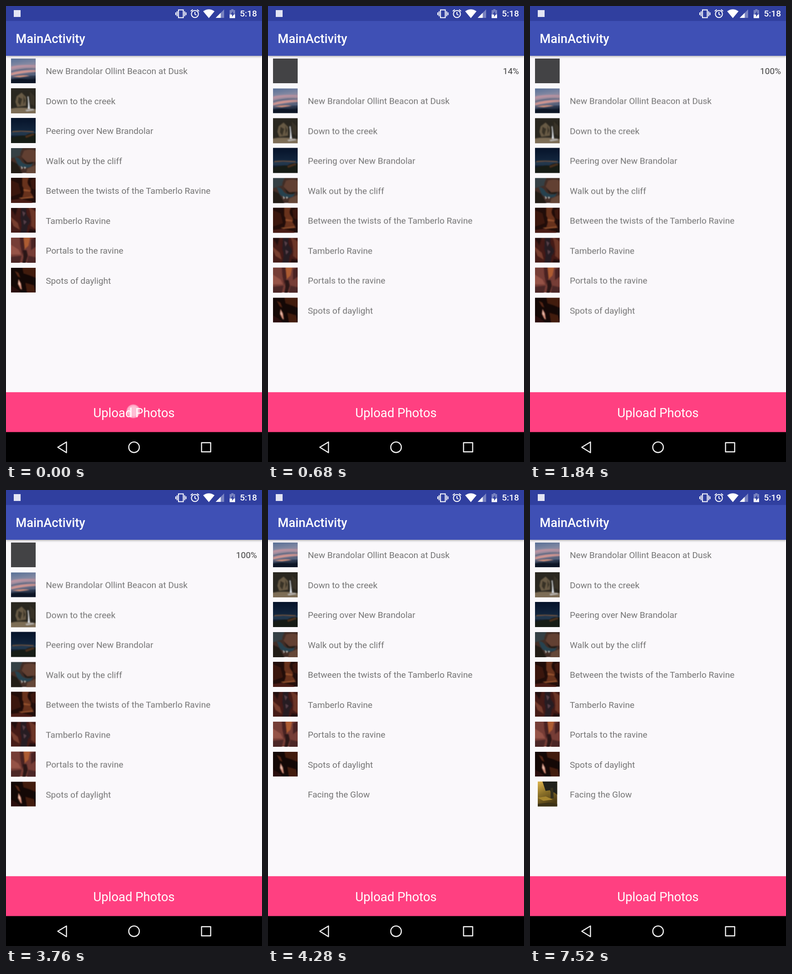
Write an HTML page that moves like this. It is 561 px wide and 998 px high and loops after 7.56 s.

```html
<!DOCTYPE html>
<html lang="en">
<head>
<meta charset="utf-8">
<title>Photo upload list</title>
<style>
  html, body { margin: 0; width: 100%; height: 100%; overflow: hidden; }
  body { position: relative; background: #faf8fb; font: 19.1px Roboto, sans-serif; color: #757575; }
  body > * { position: absolute; }

  /* every animation shares one 7560 ms loop */
  .anim { animation: 7560ms linear infinite both; }

  .bar {
    left: 0; top: 0; width: 561px; height: 109px; line-height: 145px;
    background: #3f50b5; color: #fff; font-size: 27.3px; font-weight: 500;
    text-indent: 21.3px; box-shadow: 0 2px 4px rgba(0, 0, 0, .28);
  }
  .chrome { left: 0; top: 0; }
  .button {
    left: 0; top: 845px; width: 561px; line-height: 92px;
    color: #fff; font-size: 27.3px; text-align: center;
  }
  .clock {
    right: 11px; top: 0; line-height: 34px; color: #fff;
    font-weight: 500; animation-timing-function: step-end;
  }
  .before { animation-name: before; }
  .after { animation-name: after; }
  .touch {
    left: 262.5px; top: 871px; width: 32px; height: 32px; border-radius: 50%;
    background: radial-gradient(closest-side, rgba(255,255,255,.66) 60%, rgba(255,255,255,.52) 84%, rgba(255,255,255,0));
    animation-name: touch; animation-timing-function: step-end;
  }

  .list { left: 0; top: 109.1px; width: 561px; animation-name: shift; }
  .row { display: flex; align-items: center; height: 65.47px; white-space: nowrap; }
  .row svg { flex: none; width: 54.55px; height: 54.55px; margin: 0 21.8px 0 10.9px; }
  .row span { position: relative; top: 1px; }
  .late svg { animation-name: load; }
  .late span { animation-name: label; }

  .pending { left: 0; top: 109.1px; width: 561px; height: 65.47px; animation-name: pending; }
  .pending i { position: absolute; left: 10.9px; top: 5.46px; width: 54.55px; height: 54.55px; background: #434345; }
  .pending b {
    position: absolute; right: 10.9px; top: 1px; line-height: 65.47px;
    font-weight: 400; color: #424242; animation-timing-function: ease-out;
  }

  @keyframes touch { 0% { opacity: 1 } 1.587%, 100% { opacity: 0 } }
  @keyframes before { 0% { opacity: 1 } 99.471%, 100% { opacity: 0 } }
  @keyframes after { 0% { opacity: 0 } 99.471%, 100% { opacity: 1 } }
  @keyframes shift {
    0%, 3.439% { transform: none; animation-timing-function: cubic-bezier(.37, 0, .63, 1) }
    6.746% { transform: translateY(65.47px) }
    51.217% { transform: translateY(65.47px); animation-timing-function: cubic-bezier(.37, 0, .63, 1) }
    54.524%, 100% { transform: none }
  }
  @keyframes pending {
    0%, 3.439% { opacity: 0 }
    4.9%, 49.8% { opacity: 1 }
    51.217%, 100% { opacity: 0 }
  }
  @keyframes label { 0%, 54.524% { opacity: 0 } 56.11%, 100% { opacity: 1 } }
  @keyframes load { 0%, 60.847% { opacity: 0 } 65.4%, 100% { opacity: 1 } }

  @keyframes p10 { 0%, 3.84% { opacity: 1; animation-timing-function: ease-in } 5.69%, 100% { opacity: 0 } }
  @keyframes p14 { 0%, 3.84% { opacity: 0 } 5.69%, 8.99% { opacity: 1; animation-timing-function: ease-in } 12.17%, 100% { opacity: 0 } }
  @keyframes p35 { 0%, 8.99% { opacity: 0 } 12.17%, 12.7% { opacity: 1; animation-timing-function: ease-in } 15.87%, 100% { opacity: 0 } }
  @keyframes p37 { 0%, 12.7% { opacity: 0 } 15.87%, 15.88% { opacity: 1; animation-timing-function: ease-in } 18.52%, 100% { opacity: 0 } }
  @keyframes p62 { 0%, 15.88% { opacity: 0 } 18.52%, 19.05% { opacity: 1; animation-timing-function: ease-in } 21.69%, 100% { opacity: 0 } }
  @keyframes p87 { 0%, 19.05% { opacity: 0 } 21.69%, 21.7% { opacity: 1; animation-timing-function: ease-in } 24.34%, 100% { opacity: 0 } }
  @keyframes p100 { 0%, 21.7% { opacity: 0 } 24.34%, 100% { opacity: 1 } }
</style>
</head>
<body>

<svg width="0" height="0">
  <defs>
    <linearGradient id="dusk" x2=".15" y2="1">
      <stop offset="0" stop-color="#587097"/><stop offset=".3" stop-color="#8288a2"/>
      <stop offset=".5" stop-color="#a58c9a"/><stop offset=".66" stop-color="#72738a"/>
      <stop offset=".8" stop-color="#344058"/><stop offset="1" stop-color="#101826"/>
    </linearGradient>
    <linearGradient id="night" x2="0" y2="1">
      <stop offset="0" stop-color="#06132a"/><stop offset=".5" stop-color="#12253d"/>
      <stop offset="1" stop-color="#101518"/>
    </linearGradient>
    <linearGradient id="glow" x2=".4" y2="1">
      <stop offset="0" stop-color="#e0b650"/><stop offset=".5" stop-color="#8a7029"/>
      <stop offset="1" stop-color="#4a3a14"/>
    </linearGradient>
    <filter id="soft"><feGaussianBlur stdDeviation=".9"/></filter>
  </defs>
</svg>

<div class="list anim">
  <div class="row">
    <svg viewBox="0 0 40 40">
      <path fill="url(#dusk)" d="M0 0h40v40H0z"/>
      <g filter="url(#soft)">
        <path fill="#b993a0" d="M0 13Q14 9 40 11V13Q20 13 0 17z"/>
        <path fill="#d39690" d="M0 24Q18 18 40 19V21Q20 22 0 27z"/>
        <path fill="#5a6782" d="M0 20Q18 15 40 16V17Q16 18 0 22zM14 27l26-3v3z"/>
        <path fill="#d9967f" d="M2 29Q18 26 30 28L14 30z"/>
        <path fill="#111926" d="M-2 34Q12 31 24 33T42 32V42H-2z"/>
      </g>
    </svg><span>New Brandolar Ollint Beacon at Dusk</span>
  </div>
  <div class="row">
    <svg viewBox="0 0 40 40">
      <path fill="#2a2720" d="M0 0h40v40H0z"/>
      <g filter="url(#soft)">
        <path fill="#675a44" d="M9 13L17 7L24 14L24 28L10 30L7 22z"/>
        <path fill="#383126" d="M12 14l6 3l-3 11l-4-5zM20 12l3 8l-3 6zM30 5l8 8v16l-7-4z"/>
        <path fill="#7d6d57" d="M-2 33Q18 29 42 34V42H-2z"/>
        <path fill="#b9b5b1" d="M23 35l12-2l3 2l-13 2z"/>
        <path fill="#e0e4ea" d="M26.500 13h1.500Q29 22 30.500 33H27Q28 22 26.500 13z"/>
      </g>
    </svg><span>Down to the creek</span>
  </div>
  <div class="row">
    <svg viewBox="0 0 40 40">
      <path fill="url(#night)" d="M0 0h40v40H0z"/>
      <g filter="url(#soft)">
        <path fill="#20384d" d="M-2 23Q18 21 42 22V28H-2z"/>
        <path fill="#9a6a3a" d="M2 21.300l14-.8l20 .9v.9l-20-.8l-14 .9z"/>
        <path fill="#191a17" d="M-2 33Q14 27 23 28Q31 23 42 25V42H-2z"/>
        <path fill="#48301f" d="M23 29l12-4l3 2l-14 5z"/>
      </g>
    </svg><span>Peering over New Brandolar</span>
  </div>
  <div class="row">
    <svg viewBox="0 0 40 40">
      <path fill="#432e27" d="M0 0h40v40H0z"/>
      <g filter="url(#soft)">
        <path fill="#364044" d="M-2-2H20Q14 7 15 12L-2 17z"/>
        <path fill="#623f32" d="M21 4Q35 0 42 6V22L26 23L17 14z"/>
        <path fill="#274350" d="M6 15Q13 14 17 22Q24 29 35 25L32 30Q17 35 10 25z"/>
        <path fill="#211a19" d="M-2 20L10 25L19 42H-2zM18 16l8 7l12-1l-6 4l-9-1z"/>
        <path fill="#654737" d="M26 33l16-7v16H24z"/>
        <path fill="#c3c7c4" d="M16 29l3 3l-2 2zM21 30l3 1l-2 3z"/>
      </g>
    </svg><span>Walk out by the cliff</span>
  </div>
  <div class="row">
    <svg viewBox="0 0 40 40">
      <path fill="#210d0a" d="M0 0h40v40H0z"/>
      <g filter="url(#soft)">
        <path fill="#67301c" d="M18-2H30Q24 7 29 13T31 23L36 30L18 31Q23 20 18 13z"/>
        <path fill="#3a180f" d="M-2 3L12 9L16 25L-2 31zM31 4l11-5v21l-9-3z"/>
        <path fill="#96522f" d="M20 18l10 2l2 2l-12-1zM12 32l22-2l3 2l-20 2z"/>
        <path fill="#4a1e12" d="M-2 36l16-2l20 4v4H-2z"/>
      </g>
    </svg><span>Between the twists of the Tamberlo Ravine</span>
  </div>
  <div class="row">
    <svg viewBox="0 0 40 40">
      <path fill="#451b17" d="M0 0h40v40H0z"/>
      <g filter="url(#soft)">
        <path fill="#281b21" d="M16-2H26Q22 8 28 15T27 28L25 42H14Q19 28 15 18z"/>
        <path fill="#6c3428" d="M28-2L42 7V36L32 29Q34 15 28-2z"/>
        <path fill="#773d2e" d="M-2 13L11 24L14 35L4 29z"/>
        <path fill="#59414a" d="M18 5l5 3l-3 6zM20 19l5 3l-4 5z"/>
        <path fill="#24100e" d="M-2-2h13L7 12zM30 34l12 2v6H27z"/>
      </g>
    </svg><span>Tamberlo Ravine</span>
  </div>
  <div class="row">
    <svg viewBox="0 0 40 40">
      <path fill="#763d36" d="M0 0h40v40H0z"/>
      <g filter="url(#soft)">
        <path fill="#ad5c30" d="M19-2H31L28 13L21 19z"/>
        <path fill="#482422" d="M14-2h6L22 17L18 28L15 12zM32 3L42-2V13L32 20z"/>
        <path fill="#965247" d="M-2 10L12 19L16 27L-2 27z"/>
        <path fill="#2b1719" d="M19 20h6l2 9l-4 13h-5l2-11z"/>
        <path fill="#4c2625" d="M-2 31l19-2l-3 13H-2zM28 29l14 3v10H25z"/>
      </g>
    </svg><span>Portals to the ravine</span>
  </div>
  <div class="row">
    <svg viewBox="0 0 40 40">
      <path fill="#140806" d="M0 0h40v40H0z"/>
      <g filter="url(#soft)">
        <path fill="#431c0f" d="M18-2H42V17L29 12L20 9zM23 24l14 4l3 14H26z"/>
        <path fill="#572815" d="M6 5l6 3l3 8l-4-2z"/>
        <path fill="#cf8a76" d="M12 18l4 7l1.500 10l-2.500-1l-4-8z"/>
        <path fill="#f0d4c4" d="M12 20l1.500 4l2 5l-3-3z"/>
        <path fill="#2b110a" d="M-2 27l13 8l8 7H-2z"/>
      </g>
    </svg><span>Spots of daylight</span>
  </div>
  <div class="row late">
    <svg class="anim" viewBox="0 0 40 40">
      <path fill="url(#glow)" d="M4.400 0h31.200v40H4.400z"/>
      <path fill="#20211b" d="M12 0H35.600V21L30 17L27 22L24 14L17 15z"/>
      <path fill="#33301d" d="M25 10h4l1 17h-5z"/>
      <path fill="#a5852f" d="M4.400 26l13-2l11 5l-15 2z"/>
      <path fill="#3c3216" d="M4.400 36l17-2l14.200 2v4H4.400z"/>
    </svg><span class="anim">Facing the Glow</span>
  </div>
</div>

<div class="pending anim">
  <i></i>
  <b class="anim" style="animation-name:p10">10%</b>
  <b class="anim" style="animation-name:p14">14%</b>
  <b class="anim" style="animation-name:p35">35%</b>
  <b class="anim" style="animation-name:p37">37%</b>
  <b class="anim" style="animation-name:p62">62%</b>
  <b class="anim" style="animation-name:p87">87%</b>
  <b class="anim" style="animation-name:p100">100%</b>
</div>

<div class="bar">MainActivity</div>

<svg class="chrome" width="561" height="998" fill="none" stroke="#fff" stroke-width="2">
  <g stroke="none">
    <path fill="#303f9f" d="M0 0h561v32.700H0z"/>
    <path fill="#ff4081" d="M0 845.150h561V940H0z"/>
    <path fill="#000" d="M0 932.500h561V998H0z"/>
    <path fill="#e3e5f4" d="M17 9h15v15H17z"/>
  </g>
  <path d="M378 8.500h10.500v17H378zM375 11.500v11M372 14v6M391.500 11.500v11M394.500 14v6"/>
  <circle cx="414" cy="17.500" r="7.700"/>
  <path d="M414 13v5l3.500 2M404.800 11.500l4.500-3.700M423.200 11.500l-4.500-3.700"/>
  <g fill="#fff" stroke="none">
    <path d="M432 11.500Q444.500 3 457 11.500L444.500 26.500z"/>
    <path fill-opacity=".35" d="M478 7.500V26H459.500z"/>
    <path d="M470.500 15V26H459.500z"/>
    <path fill-opacity=".35" d="M490 9h3.500V7h5v2h3.500v10H490z"/>
    <path d="M490 18.500h12V26.500H490z"/>
    <path fill="#303f9f" d="M497.500 11l-5 7.500h3v5.500l5-7.500h-3z"/>
  </g>
  <g stroke="#f2f2f2" stroke-width="2.400" stroke-linejoin="round">
    <path d="M113.500 965.700L132.500 954.200V977.500z"/>
    <circle cx="280.600" cy="965.700" r="11.600"/>
    <path d="M428.500 955.700h20v20h-20z"/>
  </g>
</svg>
<div class="button">Upload Photos</div>
<div class="clock before anim">5:18</div>
<div class="clock after anim">5:19</div>
<div class="touch anim"></div>

</body>
</html>
```
